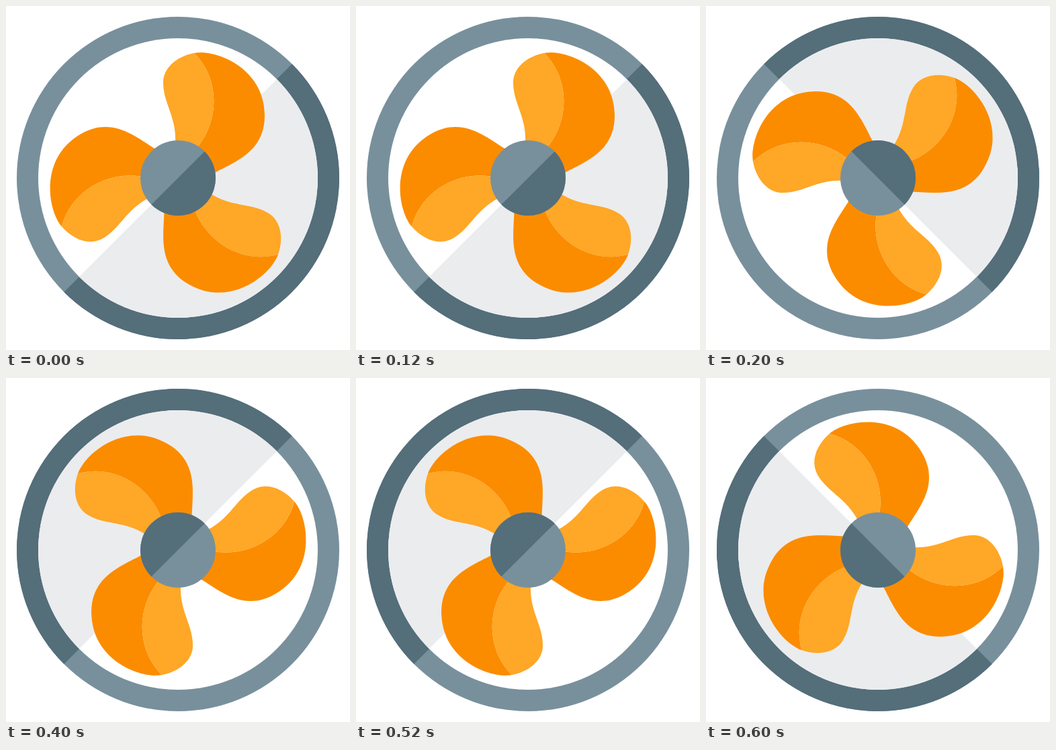
An HTML page for the animation above (0.8 s loop, 512 px wide and 512 px high).

```html
<!DOCTYPE html>
<html lang="en">
<head>
<meta charset="utf-8">
<title>Fan</title>
<style>
  html, body { margin: 0; width: 100%; height: 100%; overflow: hidden; background: #fff; }
  svg { display: block; width: 100vw; height: 100vh; }
  #fan { transform-origin: 256px 256px; }
  .light { fill: #78909c; }
  .dark { fill: #546e7a; }
</style>
</head>
<body>
<svg viewBox="0 0 512 512">
  <defs>
    <!-- lower right half of a unit disc -->
    <path id="half" d="M-.70711 .70711A1 1 0 0 0 .70711 -.70711Z"/>
    <g id="blade">
      <path fill="#fb8c00" d="M280 70C312 64 385 92 385 163C385 216 343 231 311 248L256 256L286 209C318 168 318 108 280 70Z"/>
      <path fill="#ffa726" d="M252 203C254 165 234 145 234 114C234 92 254 75 280 70C318 108 318 168 286 209L256 256Z"/>
    </g>
  </defs>
  <g id="fan">
    <circle class="light" cx="256" cy="256" r="240"/>
    <use href="#half" class="dark" transform="translate(256 256) scale(240)"/>
    <circle fill="#fff" cx="256" cy="256" r="208"/>
    <use href="#half" fill="#ebecee" transform="translate(256 256) scale(208)"/>
    <use href="#blade"/>
    <use href="#blade" transform="rotate(120 256 256)"/>
    <use href="#blade" transform="rotate(240 256 256)"/>
    <circle class="light" cx="256" cy="256" r="56"/>
    <use href="#half" class="dark" transform="translate(256 256) scale(56)"/>
  </g>
</svg>
<script>
  // One full counter-clockwise turn in four held quarter steps.
  document.getElementById('fan').animate(
    [{ transform: 'rotate(0deg)' }, { transform: 'rotate(-360deg)' }],
    { duration: 800, iterations: Infinity, easing: 'steps(4, end)' }
  );
</script>
</body>
</html>
```
